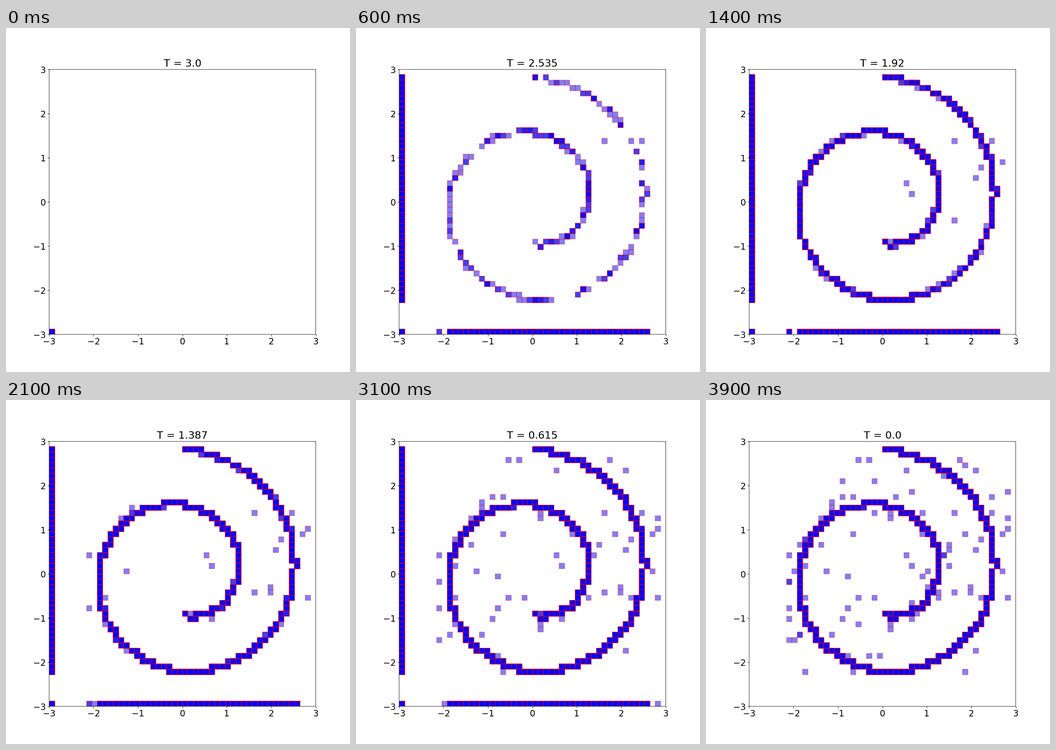
Animation of 748x748 px, one loop 4000 ms. Source, as a matplotlib script:

```python
import numpy as np
import matplotlib.pyplot as plt
from matplotlib.animation import FuncAnimation
from matplotlib.collections import PolyCollection

FRAMES, STEPS, T_MAX = 40, 400, 3.0
BINS, CELL = 50, 0.12
SAMPLES, STRAYS, MAX_LAYERS = 12000, 110, 10

rng = np.random.default_rng(7)

# Points of a spiral r = t / 5, binned to a grid; bin 0 means "still masked"
t = 1.5 * np.pi * (1 + 2 * rng.random(SAMPLES))
points = 0.2 * t * np.array([np.cos(t), np.sin(t)])
bins = np.floor((points + 3) / CELL).astype(int)
reveal_at = rng.random((2, SAMPLES))

# A few samples land off the curve
offset = np.rint(rng.laplace(0, 3, (2, STRAYS))).astype(int)
bins[:, :STRAYS] = np.clip(bins[:, :STRAYS] + offset, [[7], [6]], 48)


def top_layers(cells):
    """Keep the last few entries of each cell, in drawing order."""
    ids = (cells[:, 0] * BINS + cells[:, 1])[::-1]
    order = np.argsort(ids, kind="stable")
    ranked = ids[order]
    rank = np.arange(len(ids)) - np.searchsorted(ranked, ranked)
    keep = len(ids) - 1 - order[rank < MAX_LAYERS]
    return cells[np.sort(keep)]


plt.rcParams["font.family"] = "DejaVu Sans"
plt.rcParams["font.size"] = 18
fig, ax = plt.subplots(figsize=(10, 10), dpi=74.8)
fig.subplots_adjust(left=0.1255, right=0.9005, bottom=0.1095, top=0.8795)
ax.set_xlim(-3, 3)
ax.set_ylim(-3, 3)
ax.set_xticks(range(-3, 4))
ax.set_yticks(range(-3, 4))
for spine in ax.spines.values():
    spine.set_snap(False)
title = ax.set_title("")

# Cell borders in figure units, rounded to a thousandth
line = np.arange(BINS + 1)
x_edges = (np.floor(125.5 + 15.5 * line) + 0.5) / 1000
y_edges = 1 - (np.floor(890.5 - 15.4 * line) + 0.5) / 1000

boxes = PolyCollection([], facecolors="blue", edgecolors="red",
                       linewidths=1, alpha=0.5, snap=False,
                       transform=fig.transFigure)
ax.add_collection(boxes, autolim=False)


def outline(cells):
    """Corner points of each cell, shape (n, 4, 2)."""
    col, row = cells.T
    x = x_edges[np.stack([col, col + 1, col + 1, col], axis=1)]
    y = y_edges[np.stack([row, row, row + 1, row + 1], axis=1)]
    return np.stack([x, y], axis=2)


def update(frame):
    step = round(STEPS * frame / (FRAMES - 1))
    title.set_text(f"T = {round(T_MAX - step * 0.0075, 3)}")
    shown = np.where(reveal_at < step / STEPS, bins, 0).T
    boxes.set_verts(outline(top_layers(shown)))
    return boxes, title


anim = FuncAnimation(fig, update, frames=FRAMES, interval=100,
                     repeat=True, repeat_delay=0, blit=False)
plt.show()
```
